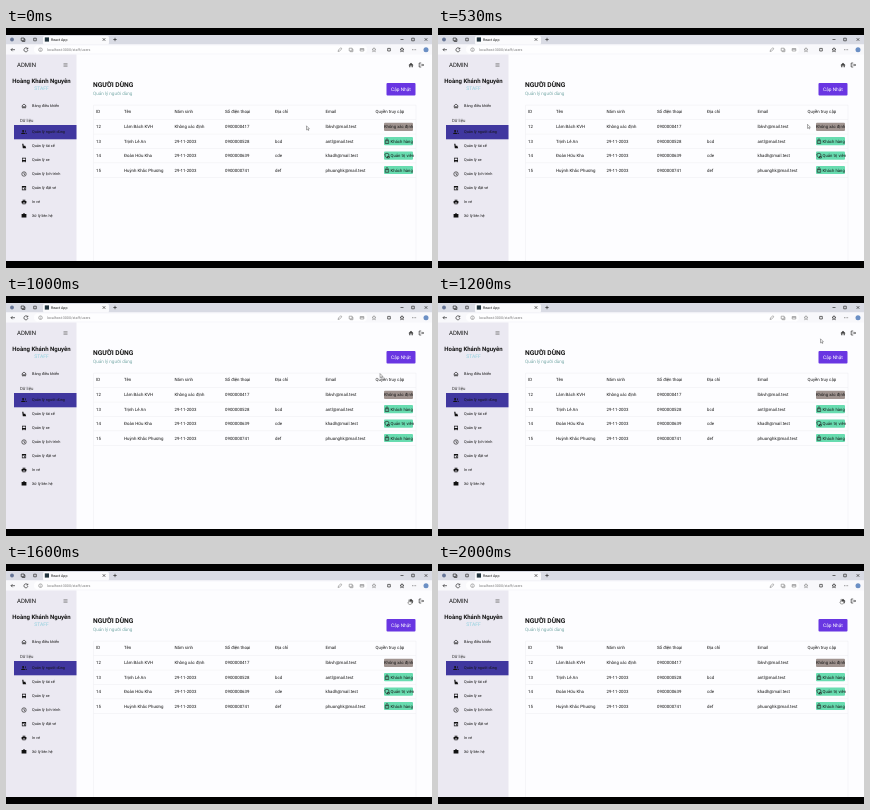
Animation, 426 px wide and 240 px high, one loop 2.07 s. Source, as an HTML page:

```html
<!DOCTYPE html>
<html lang="vi">
<head>
<meta charset="utf-8">
<title>User table</title>
<style>
html, body { margin: 0; width: 100%; height: 100%; overflow: hidden; background: #000; }
svg { display: block; width: 100vw; height: 100vh; }
text { font-family: Roboto, "Noto Sans", sans-serif; fill: #151515; text-rendering: geometricPrecision; }
.line { fill: none; stroke: #222; stroke-width: .65; }
</style>
</head>
<body>
<svg id="stage" viewBox="0 0 426 240"></svg>
<script>
const NS = 'http://www.w3.org/2000/svg';
const stage = document.getElementById('stage');

function add(tag, attrs, parent = stage) {
  const el = document.createElementNS(NS, tag);
  for (const key in attrs) el.setAttribute(key, attrs[key]);
  parent.appendChild(el);
  return el;
}
const rect = (x, y, width, height, fill, rx = 0) => add('rect', { x, y, width, height, fill, rx });
const dot = (cx, cy, r, fill) => add('circle', { cx, cy, r, fill });
function label(str, x, y, size, more = {}) {
  add('text', { x, y, 'font-size': size, ...more }).textContent = str;
}
function icon(name, x, y, more = {}) {
  const [d, solid] = icons[name];
  const style = solid ? { fill: '#111', 'fill-rule': 'evenodd' } : { class: 'line' };
  return add('path', { d, transform: `translate(${x} ${y})`, ...style, ...more });
}

// Each icon is centred on the origin; true marks a filled shape.
const icons = {
  home: ['M-2.6 .2 0-2.3 2.6 .2H1.8V2.3H.6V.6H-.6V2.3H-1.8V.2Z', true],
  house: ['M-2.3 .1 0-2 2.3 .1M-1.6-.4V2H-.5V.6H.5V2H1.6V-.4'],
  people: ['M-1.9-1a1 1 0 1 1 2 0a1 1 0 1 1-2 0M-2.8 2V1.2Q-.9-.4 1 1.2V2ZM1-1.8a.9 .9 0 0 1 0 1.8M1.5 .6Q2.8 .8 2.8 2H1.7Z', true],
  seat: ['M-1.8-2.3H-.6L-.3-.2H1.3L2.2 2.2H-1.2Z', true],
  bus: ['M-2-2.2H2V1.6H1.6V2.3H.8V1.6H-.8V2.3H-1.6V1.6H-2ZM-1.4-1.5V-.1H1.4V-1.5Z', true],
  clock: ['M-2.2 0a2.2 2.2 0 1 0 4.4 0a2.2 2.2 0 1 0-4.4 0M0-1.3V.1L1 .8'],
  calendar: ['M-2.1-2H2.1V2.2H-2.1ZM-1.5-.6V1.6H1.5V-.6ZM.1 .2H1.1V1.2H.1Z', true],
  printer: ['M-1.4-2.2H1.4V-1.2H-1.4ZM-2.4-.9H2.4V1.2H1.5V2.2H-1.5V1.2H-2.4ZM-.9 .4V1.6H.9V.4Z', true],
  bag: ['M-.9-2.2H.9V-1.4H2.4V2.1H-2.4V-1.4H-.9ZM-.4-1.8V-1.4H.4V-1.8Z', true],
  lock: ['M-1.7-.5H1.7V2.3H-1.7ZM-1-.5V-1.4a1 1 0 0 1 2 0V-.5M0 .5V1.3'],
  shield: ['M-2.2-1.6 0-2.4 1.8-1.6V0Q1.4 1.6-.2 2.3-2.2 1.5-2.2-1.6M.2 .8H2.4V2.4H.2Z'],
  exit: ['M0-2H-2V2H0M-.7 0H2.3M1.3-1.1 2.4 0 1.3 1.1'],
  menu: ['M-2-1.3H2M-2 0H2M-2 1.3H2'],
  back: ['M2 0H-2M-.5-1.5-2 0-.5 1.5'],
  reload: ['M1.6-1A2 2 0 1 0 1.9 .5M1.8-2V-.7H.5'],
  info: ['M-1.8 0a1.8 1.8 0 1 0 3.6 0a1.8 1.8 0 1 0-3.6 0M0-.1V1M0-1V-.7'],
  tabs: ['M-1.8-1.5H1.1V1.2H-1.8ZM-.7 1.2V2H1.9V-.6H1.1'],
  star: ['M0-2 .6-.6 2-.5 .9 .5 1.3 2 0 1.1-1.3 2-.9 .5-2-.5-.6-.6Z'],
  plus: ['M-1.7 0H1.7M0-1.7V1.7'],
  cross: ['M-1.3-1.3 1.3 1.3M1.3-1.3-1.3 1.3'],
  dash: ['M-1.5 0H1.5'],
  box: ['M-1.3-1.3H1.3V1.3H-1.3Z'],
  card: ['M-1.8-1.2H1.8V1.3H-1.8ZM-1.8-.3H1.8'],
  pen: ['M-2 1.8-1.4 .2 .8-2 1.9-.9-.4 1.3Z'],
  dots: ['M-2 0H-1.3M-.3 0H.4M1.4 0H2.1']
};

function drawBrowser() {
  rect(0, 7, 426, 226, '#fdfdff');
  rect(0, 7, 426, 9.5, '#d9dbe4');
  rect(37, 8, 66, 8.5, '#fafafc', 1.5);
  dot(6, 11.5, 1.9, '#667596');
  icon('tabs', 17, 11.5);
  icon('box', 29, 11.5);
  rect(38.8, 9.4, 4.2, 4.2, '#20333d');
  label('React App', 45, 12.8, 3.6);
  icon('cross', 98, 11.5);
  icon('plus', 109, 11.5);
  icon('dash', 396, 11.5);
  icon('box', 407, 11.5);
  icon('cross', 420, 11.5);

  rect(0, 16.5, 426, 10, '#f8f8fb');
  rect(28, 17.5, 333, 8, '#fefeff', 4);
  icon('back', 7, 21.7);
  icon('reload', 20, 21.7);
  const pale = { style: 'stroke:#888' };
  [['info', 34.5], ['pen', 334], ['tabs', 345], ['card', 356], ['star', 368]]
    .forEach(([name, x]) => icon(name, x, 21.7, pale));
  [['box', 383], ['star', 396], ['dots', 408]]
    .forEach(([name, x]) => icon(name, x, 21.7));
  dot(420, 21.7, 2.5, '#6b8fc4');
  label('localhost:3000/staff/users', 41, 22.9, 3.65, { style: 'fill:#777' });
}

function drawSidebar() {
  rect(0, 26.5, 70.5, 206.5, '#ebe9f2');
  label('ADMIN', 11, 39.2, 6);
  icon('menu', 59.5, 37, { style: 'stroke:#777' });
  const middle = { 'text-anchor': 'middle' };
  label('Hoàng Khánh Nguyên', 35.5, 55.4, 6, { ...middle, 'font-weight': 700 });
  label('STAFF', 35.5, 62, 5, { ...middle, style: 'fill:#91d0de' });
  label('Dữ liệu', 14, 94, 4.3, { style: 'fill:#333' });
  rect(8, 97, 62.5, 14.3, '#40379f');
  [['house', 'Bảng điều khiển', 78], ['people', 'Quản lý người dùng', 104],
    ['seat', 'Quản lý tài xế', 118], ['bus', 'Quản lý xe', 132],
    ['clock', 'Quản lý lịch trình', 146], ['calendar', 'Quản lý đặt vé', 160],
    ['printer', 'In vé', 174], ['bag', 'Xử lý liên hệ', 187.5]]
    .forEach(([name, str, y]) => {
      icon(name, 18, y);
      label(str, 26, y + 1.2, 3.85);
    });
}

const columns = [90, 118, 168.5, 219, 269, 319.5, 369.5];
function drawRow(cells, y) {
  cells.forEach((str, i) => label(str, columns[i], y + 1.5, 4.35));
}

function drawTable() {
  label('NGƯỜI DÙNG', 87, 59, 6.7, { 'font-weight': 700 });
  label('Quản lý người dùng', 87, 66.8, 4.6, { style: 'fill:#79aaa9' });
  rect(380.5, 55, 29, 12.5, '#6936e2', 1);
  label('Cập Nhật', 395, 63, 4.8, { 'text-anchor': 'middle', style: 'fill:#fff' });

  const rule = '#ededf0';
  add('path', { d: 'M87.5 233V77.2H410V233', fill: 'none', stroke: rule, 'stroke-width': .5 });
  drawRow(['ID', 'Tên', 'Năm sinh', 'Số điện thoại', 'Địa chỉ', 'Email', 'Quyền truy cập'], 83.5);
  const born = '29-11-2003';
  const users = [
    [['12', 'Lâm Bách KVH', 'Không xác định', '0900000417', '', 'lbkvh@mail.test'], 'Không xác định'],
    [['13', 'Trịnh Lê An', born, '0900000528', 'bcd', 'antl@mail.test'], 'Khách hàng', 'lock'],
    [['14', 'Đoàn Hữu Kha', born, '0900000639', 'cde', 'khadh@mail.test'], 'Quản trị viên', 'shield'],
    [['15', 'Huỳnh Khắc Phương', born, '0900000741', 'def', 'phuonghk@mail.test'], 'Khách hàng', 'lock']
  ];
  users.forEach(([cells, role, mark], i) => {
    const y = 98.8 + i * 14.4;
    rect(87.5, y - 7.4, 322.5, .5, rule);
    drawRow(cells, y);
    rect(378, y - 4.1, 29, 8.2, mark ? '#68dcb0' : '#a09490', 1);
    if (mark) icon(mark, 381, y);
    label(role, mark ? 384.5 : 392.5, y + 1.5, 4.25, { 'text-anchor': mark ? 'start' : 'middle' });
  });
  rect(87.5, 149, 322.5, .5, rule);
  icon('home', 405, 37, { fill: '#444' });
  icon('exit', 415.2, 37);
}

drawBrowser();
drawSidebar();
drawTable();

const shapes = {
  arrow: 'M0-2.5V2.2L1.1 1.2 1.9 2.9 2.6 2.5 1.9 .9H3.3Z',
  beam: 'M-.9-2.5H.9M0-2.5V2.5M-.9 2.5H.9',
  hand: 'M-.7-2.5Q0-3 .2-2.2V-.4L2.1 .1Q2.7 .4 2.3 1.5L1.8 2.8H-.7L-2 .7Q-1.5 .1-.7 .7Z'
};
const cursor = add('path', { fill: '#fff', stroke: '#444', 'stroke-width': .5 });

// time, x, y
const path = [[0, 300.5, 100], [200, 345, 99], [470, 369.5, 98.5], [870, 369.5, 98.5],
  [1200, 382.5, 45], [1500, 403.5, 38], [2070, 403.5, 37.5]];
const LOOP = 2070, STEP = LOOP / 31;

function place(t) {
  const i = path.findIndex((p, n) => n > 0 && t <= p[0]);
  const [t0, x0, y0] = path[i - 1], [t1, x1, y1] = path[i];
  const k = (t - t0) / (t1 - t0);
  const ease = i === 1 ? k : k * k * (3 - 2 * k);
  const x = x0 + (x1 - x0) * ease, y = y0 + (y1 - y0) * ease;
  const overText = y > 95 && x > 319 && x < 353;
  const overLink = x > 401 || (x > 380 && y > 55 && y < 68);
  cursor.setAttribute('d', shapes[overText ? 'beam' : overLink ? 'hand' : 'arrow']);
  cursor.setAttribute('transform', `translate(${x} ${y}) scale(.88)`);
}

const start = performance.now();
function tick() {
  const t = (performance.now() - start) % LOOP;
  // Steps fall on whole hundredths of a second, slightly before their exact time.
  place(Math.floor((t + 5) / STEP) * STEP % LOOP);
  requestAnimationFrame(tick);
}
tick();
</script>
</body>
</html>
```
